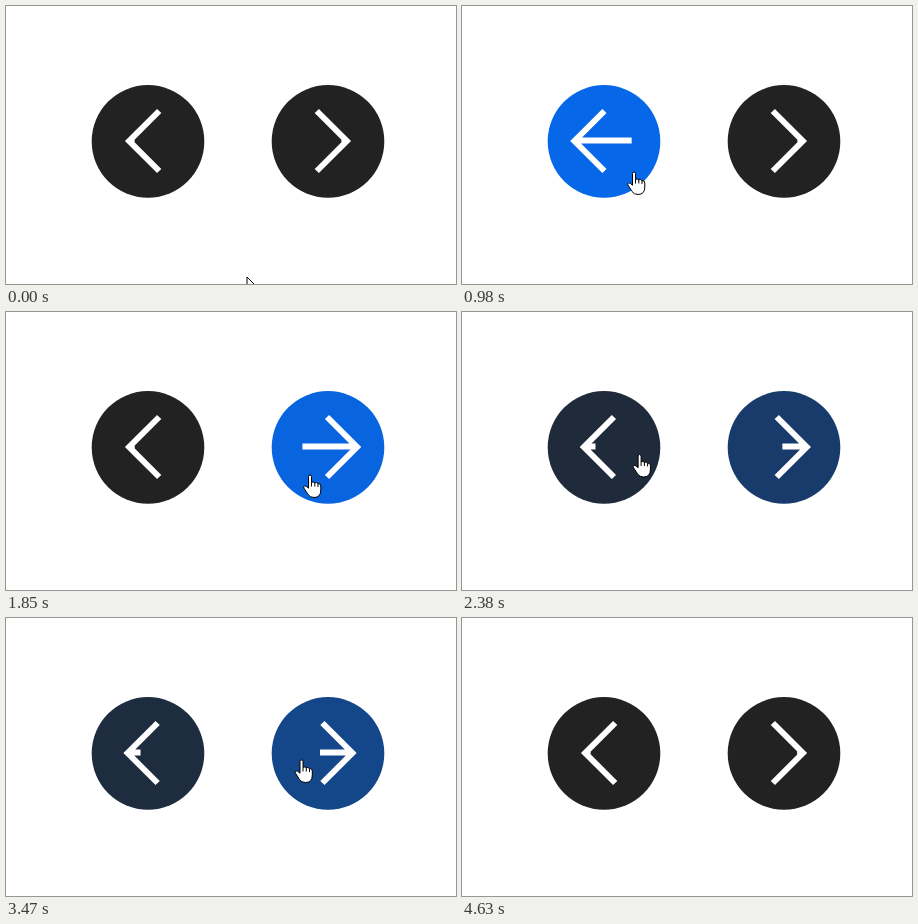
Recreate the animation shown at these times as an HTML page. Size 450x278 px, loop 4.88 s.

```html
<!DOCTYPE html>
<html lang="en">
<head>
<meta charset="utf-8">
<title>Arrow buttons</title>
<style>
  html, body { margin: 0; width: 100%; height: 100%; overflow: hidden; background: #fff; }
  svg { display: block; width: 450px; height: 278px; }
  .arrow { fill: none; stroke: #fff; stroke-width: 6; }
  .pointer { fill: #fff; stroke: #000; stroke-linejoin: round; }
</style>
</head>
<body>
<svg viewBox="0 0 450 278">
  <g class="button">
    <circle cx="142" cy="135.4" r="56.3"/>
    <path class="arrow"/>
  </g>
  <g class="button" transform="translate(464 0) scale(-1 1)">
    <circle cx="142" cy="135.4" r="56.3"/>
    <path class="arrow"/>
  </g>
  <g id="cursor" class="pointer">
    <path id="plain" d="M0 0V16L3.8 12.4 6.2 18 8.4 17 6 11.5H11.5Z"/>
    <path id="hand" d="M-1.5 1.5Q-1.5 0 0 0T1.5 1.5V7.5Q3 6.2 4.8 7.8 6.5 6.8 8 8.6 10.8 8.2 10.8 11V15Q10.8 22.5 4 22.5 0 22.5-2 19.5L-6 13.2Q-7 11.5-5.6 10.9-4 10.6-1.5 13.2ZM1.5 7.5V11.5M4.8 7.8V11.5M8 8.6V12"/>
  </g>
</svg>
<script>
const LOOP = 4880, FADE = 600;
const STEP = 78, PHASE = 34;
const REST = [34, 34, 34], ACTIVE = [6, 105, 238];

// Hover intervals of the left and right button.
const hovers = [
  [[485, 1270], [2306, 3128]],
  [[1424, 2150], [3287, 4022]]
];

const origin = { x: 241, y: 271 };
const moves = [
  { from: 60, to: 70, x: 232, y: 269 },
  { from: 240, to: 605, x: 172, y: 166 },
  { from: 1180, to: 1540, x: 304, y: 163 },
  { from: 2020, to: 2410, x: 174.5, y: 142 },
  { from: 3030, to: 3420, x: 295.5, y: 142 },
  { from: 3890, to: 4250, x: 304, y: 290 }
];

const mix = (a, b, p) => a + (b - a) * p;
const clamp = u => Math.min(1, Math.max(0, u));
const smooth = u => u * u * (3 - 2 * u);
const bezier = (a, b, s) => 3 * a * s * (1 - s) ** 2 + 3 * b * s * s * (1 - s) + s ** 3;

// The CSS "ease" curve: cubic-bezier(.25, .1, .25, 1)
function ease(u) {
  let low = 0, high = 1;
  for (let i = 0; i < 20; i++) {
    const mid = (low + high) / 2;
    if (bezier(.25, .25, mid) < u) low = mid; else high = mid;
  }
  return bezier(.1, 1, low);
}

const fade = elapsed => ease(clamp(elapsed / FADE));
const hoverAmount = (spans, t) => spans.reduce((sum, [on, off]) =>
  sum + fade(t - on) - fade(t - off), 0);

const pointerAt = t => moves.reduce((pos, { from, to, x, y }) => {
  const p = smooth(clamp((t - from) / (to - from)));
  return { x: mix(pos.x, x, p), y: mix(pos.y, y, p) };
}, origin);

const buttons = [...document.querySelectorAll('.button')];
const [cursor, plain, hand] = ['cursor', 'plain', 'hand'].map(id => document.getElementById(id));

function drawButton(button, p) {
  const [disc, arrow] = button.children;
  const color = REST.map((c, i) => Math.round(mix(c, ACTIVE[i], p)));
  const tip = 123.2 - 11 * p;
  disc.setAttribute('fill', `rgb(${color})`);
  arrow.setAttribute('d', `M${tip + 30} 105l-30 30 30 30M${tip} 134.6H${128.6 + 42 * p}`);
}

function draw(t) {
  buttons.forEach((button, i) => drawButton(button, hoverAmount(hovers[i], t)));
  const over = hovers.flat().some(([on, off]) => t >= on && t < off);
  plain.style.display = over ? 'none' : '';
  hand.style.display = over ? '' : 'none';
  const { x, y } = pointerAt(t);
  cursor.setAttribute('transform', `translate(${x} ${y})`);
}

const start = performance.now();
function frame() {
  const now = (performance.now() - start) % LOOP;
  draw(Math.floor((now - PHASE) / STEP) * STEP + PHASE);
  requestAnimationFrame(frame);
}
frame();
</script>
</body>
</html>
```
